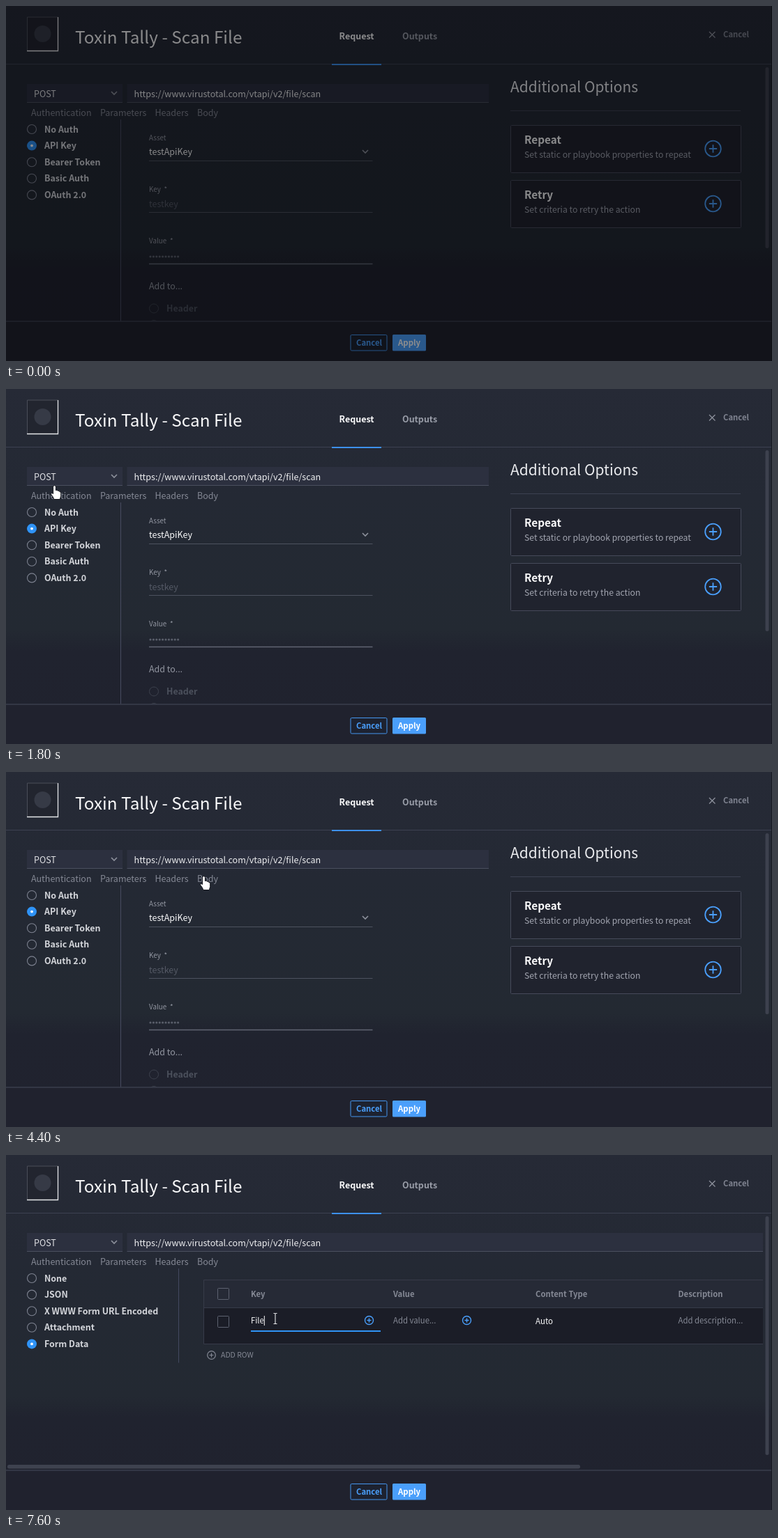
Animation of 1098x510 px, one loop 8 s. Source, as an HTML page:

```html
<!DOCTYPE html>
<html lang="en">
<head>
<meta charset="utf-8">
<title>Request editor</title>
<style>
  html, body { margin: 0; width: 100%; height: 100%; overflow: hidden; background: #20222e; }
  svg { display: block; width: 1098px; height: 510px; }
  text { font-family: "Noto Sans CJK SC", "Noto Sans CJK JP", "Noto Sans CJK KR", "Noto Sans CJK", "Noto Sans", sans-serif; white-space: pre; }
</style>
</head>
<body>
<svg id="stage" viewBox="0 0 1098 510" xmlns="http://www.w3.org/2000/svg"></svg>
<script>
const BLUE = '#4a9ffb', VIVID = '#2f93f6', EDGE = '#3d4152', MUTED = '#858995', LIGHT = '#d3d5da', WHITE = '#fafafb';

// Drawing helpers, each returning markup
const text = (x, y, s, size = 12.5, fill = MUTED, weight = 400) =>
  `<text x="${x}" y="${y}" font-size="${size}" fill="${fill}" font-weight="${weight}">${s}</text>`;
const rect = (x, y, w, h, fill, stroke = 'none', rx = 0) =>
  `<rect x="${x}" y="${y}" width="${w}" height="${h}" fill="${fill}" stroke="${stroke}" rx="${rx}"/>`;
const path = (d, stroke, width = 1, fill = 'none', more = '') =>
  `<path d="${d}" stroke="${stroke}" stroke-width="${width}" fill="${fill}" ${more}/>`;
const circle = (x, y, r, fill, stroke = 'none', width = 1) =>
  `<circle cx="${x}" cy="${y}" r="${r}" fill="${fill}" stroke="${stroke}" stroke-width="${width}"/>`;
const group = (id, body) => `<g id="${id}">${body}</g>`;
const chevron = (x, y) => path(`M${x - 4} ${y - 2}l4 4 4-4`, '#8d919c', 1.6);
const plus = (x, y, r, color, width) =>
  circle(x, y, r, 'none', color, width) + path(`M${x - r / 2} ${y}h${r}M${x} ${y - r / 2}v${r}`, color, width);
const radios = (labels, chosen) => labels.map((label, i) => {
  const y = 177 + i * 23.6;
  const mark = i === chosen
    ? circle(37, y, 7, VIVID) + circle(37, y, 1.9, '#fff')
    : circle(37, y, 6.5, 'none', '#7d8290', 1.1);
  return mark + text(55, y + 4.5, label, 12.45, LIGHT, 700);
}).join('');
const field = (right) => rect(173.5, 112, right - 173.5, 26, '#2c303f') + path(`M173.5 138.5H${right}`, '#4a4f5f') +
  text(183.5, 130.5, 'https://www.virustotal.com/vtapi/v2/file/scan', 12.57, '#eeeff1');
const card = (y, title, note) => rect(723.5, y + .5, 330, 68, '#20232e', '#464a5a', 1) +
  text(743, y + 26.5, title, 15.3, WHITE, 700) + text(743, y + 46.5, note, 12.23, '#a2a5b0') +
  plus(1013.5, y + 34, 11.3, BLUE, 1.8);
const underline = (y, color = '#4d525f', width = 1) => path(`M205 ${y}H525.5`, color, width);

const authView =
  field(692) +
  radios(['No Auth', 'API Key', 'Bearer Token', 'Basic Auth', 'OAuth 2.0'], 1) +
  path('M164.5 163V453', '#474b60') +
  text(205, 192.5, 'Asset', 9.9, '#9397a2') + text(205, 214, 'testApiKey', 12.5, WHITE) +
  chevron(515, 209) + underline(222.5) +
  text(205, 266.5, 'Key', 9.8, '#9397a2') + text(226.5, 267, '*', 9.8, '#9397a2') +
  text(205, 288.5, 'testkey', 12.45, '#555a66') + underline(296.5) +
  text(205, 340.5, 'Value', 9.8, '#9397a2') + text(235, 341, '*', 9.8, '#9397a2') +
  path('M207 360H247', '#5a5f6b', 3.2, 'none', 'stroke-linecap="round" stroke-dasharray="0 4.4"') +
  underline(370.5, '#5f6472', 1.6) +
  text(205, 407, 'Add to...', 12.45, '#9397a2') +
  circle(212, 434.5, 6.5, 'none', '#3c414d') + text(230, 438.5, 'Header', 12.4, '#4b505c', 700) +
  circle(212, 458, 6.5, 'none', '#3c414d') +
  text(723, 124, 'Additional Options', 20.95, '#ebecef') + path('M723 150.5H1053', '#3d4152') +
  card(171, 'Repeat', 'Set static or playbook properties to repeat') +
  card(250, 'Retry', 'Set criteria to retry the action') +
  rect(1088.5, 88, 5, 260, '#3d414e', 'none', 2.5);

const checkbox = y => rect(303.5, y + .5, 16, 16, 'none', '#5d6270', 1);
const bodyView =
  field(1085) +
  radios(['None', 'JSON', 'X WWW Form URL Encoded', 'Attachment', 'Form Data'], 4) +
  path('M247.5 163V298.5', '#434860') +
  rect(283, 179, 802, 40, '#262a36') + rect(283, 219, 802, 52, '#1b1d27') +
  path('M1085 179.5H283.5V271.5H1085M283 219.5H1085', '#373b49') +
  checkbox(191) + checkbox(231) +
  [[351, 'Key'], [555, 'Value'], [759, 'Content Type'], [963.5, 'Description']]
    .map(([x, s]) => text(x, 203.5, s, 11.3, MUTED, 700)).join('') +
  `<text id="key" x="351" y="242" font-size="11.3"></text>` +
  group('keyPlus', plus(456.5, 237.5, 6, BLUE, 1.4)) +
  group('focus', path('M351 253H537', VIVID, 2)) +
  group('caret', path('M351.5 231V245', WHITE)) +
  text(555, 242, 'Add value...', 11.35) + plus(660.5, 237.5, 6, BLUE, 1.4) +
  text(759, 243, 'Auto', 11.5, WHITE) + text(963.5, 242, 'Add description...', 11.35) +
  plus(294.5, 287.5, 5.8, MUTED, 1.2) + text(308, 291.3, 'ADD ROW', 10.5) +
  rect(1088.5, 88, 5, 343, '#3d414e', 'none', 2.5) + rect(2, 445, 821, 5.5, '#3e424f', 'none', 2.5);

const frame =
  path('M0 83.5H1098', EDGE) + path('M467 84H538', '#3d91ee', 2) +
  rect(31, 16, 43.5, 48.5, '#22252f') + path('M30.5 65V16H75', '#4a4e59') + path('M74.5 16V64.5H30', '#e4e5e8', 1.3) +
  circle(52.5, 40, 12, '#363a46') +
  text(99, 54, 'Toxin Tally', 24.3, WHITE) + text(223.5, 54, '- Scan File', 24.3, WHITE) +
  text(477.5, 48, 'Request', 12.5, WHITE, 700) + text(568, 47.5, 'Outputs', 12.5, '#989ca7', 700) +
  path('M1008 37l8.5 8.5M1016.5 37l-8.5 8.5', '#8d919c', 1.3) + text(1028, 44.5, 'Cancel', 11.3, '#7f8390', 700) +
  rect(30, 112, 137, 26, '#2c303f') + path('M30 138.5H167', '#4a4f5f') +
  text(40, 130.5, 'POST', 12.5, '#e0e1e5') + chevron(155, 125) +
  [[36, 'Authentication'], [135, 'Parameters'], [213.5, 'Headers'], [274, 'Body']]
    .map(([x, s]) => text(x, 157.5, s)).join('');

const footer =
  rect(0, 453, 1098, 57, '#20222e') + path('M0 453H1098', '#3a3e4c', 1.6) +
  rect(494, 472.5, 52, 22.5, '#1d2230', '#4596f0', 1.5) + text(502, 488, 'Cancel', 11.3, BLUE, 700) +
  rect(554, 472, 48, 23.5, BLUE, 'none', 1.5) + text(562, 488, 'Apply', 11.4, '#fff', 700) +
  path('M1097.5 0V510', '#171a22');

const pointers =
  group('hand', path('M-1.9 1.8Q0-1.8 1.9 1.8V7Q3.8 5.9 4.6 7.8Q6.6 7 7.2 9Q9.2 8.8 9.2 11V15Q8.6 17.5 7.8 20H-.6Q-1.4 17-4.8 12.8Q-5.2 9.8-1.9 12Z', '#14161c', 1, '#fff')) +
  group('arrow', path('M0 0V16.2L3.8 12.7L6.3 18.4L8.8 17.3L6.4 11.8H11.6Z', '#14161c', 1, '#fff')) +
  group('beam', path('M-2.5-7.5H-1Q0-7.5 0-6.5V6.5Q0 7.5-1 7.5H-2.5M2.5-7.5H1Q0-7.5 0-6.5M2.5 7.5H1Q0 7.5 0 6.5', '#e6e7ea', 1.1));

document.getElementById('stage').innerHTML =
  `<defs><linearGradient id="bg" x2="0" y2="1">
    <stop stop-color="#262a36"/><stop offset=".3" stop-color="#242934"/>
    <stop offset=".68" stop-color="#232932"/><stop offset=".74" stop-color="#20232f"/><stop offset="1" stop-color="#20222e"/>
  </linearGradient></defs>` +
  rect(0, 0, 1098, 510, 'url(#bg)') + frame + group('auth', authView) + group('body', bodyView) +
  footer + pointers + group('shade', rect(0, 0, 1098, 510, 'rgba(0,0,4,.45)'));

const $ = Object.fromEntries([...document.querySelectorAll('#stage [id]')].map(el => [el.id, el]));
const show = (el, on) => el.setAttribute('display', on ? 'inline' : 'none');

// Pointer route: time, x, y
const route = [
  [1000, -12, 118], [1400, 98, 124], [1800, 69.5, 138.5], [2400, 33, 200], [3200, 33, 200],
  [3400, 52.5, 191.5], [4400, 283.5, 149.5], [5000, 283.5, 149.5], [5400, 299, 185], [6200, 386, 235], [8000, 386, 235],
];
function pointerAt(t) {
  const i = route.findIndex(p => p[0] > t);
  if (i < 1) return route[0].slice(1);
  const [t0, x0, y0] = route[i - 1], [t1, x1, y1] = route[i];
  const k = (t - t0) / (t1 - t0);
  return [x0 + (x1 - x0) * k, y0 + (y1 - y0) * k];
}

function draw(now) {
  const t = Math.floor(now % 8000 / 200) * 200;
  const inBody = t >= 4800, focused = t >= 6400;
  const typed = 'File'.slice(0, t < 7200 ? 0 : t < 7400 ? 1 : t < 7600 ? 2 : 4);

  show($.shade, t < 200);
  show($.auth, !inBody);
  show($.body, inBody);
  show($.focus, focused);
  show($.caret, focused);
  $.keyPlus.setAttribute('transform', `translate(${focused ? 64 : 0} 0)`);
  $.key.textContent = typed || 'Add key...';
  $.key.setAttribute('fill', typed ? WHITE : MUTED);
  if (focused) {
    const width = typed ? $.key.getComputedTextLength() : 0;
    $.caret.setAttribute('transform', `translate(${width} 0)`);
  }

  const [x, y] = pointerAt(t);
  const kind = t < 1000 ? '' : t < 5200 ? 'hand' : t < 6000 ? 'arrow' : 'beam';
  for (const id of ['hand', 'arrow', 'beam']) {
    show($[id], id === kind);
    $[id].setAttribute('transform', `translate(${x} ${y})`);
  }
}

const start = performance.now();
(function loop() {
  draw(performance.now() - start);
  requestAnimationFrame(loop);
})();
</script>
</body>
</html>
```
